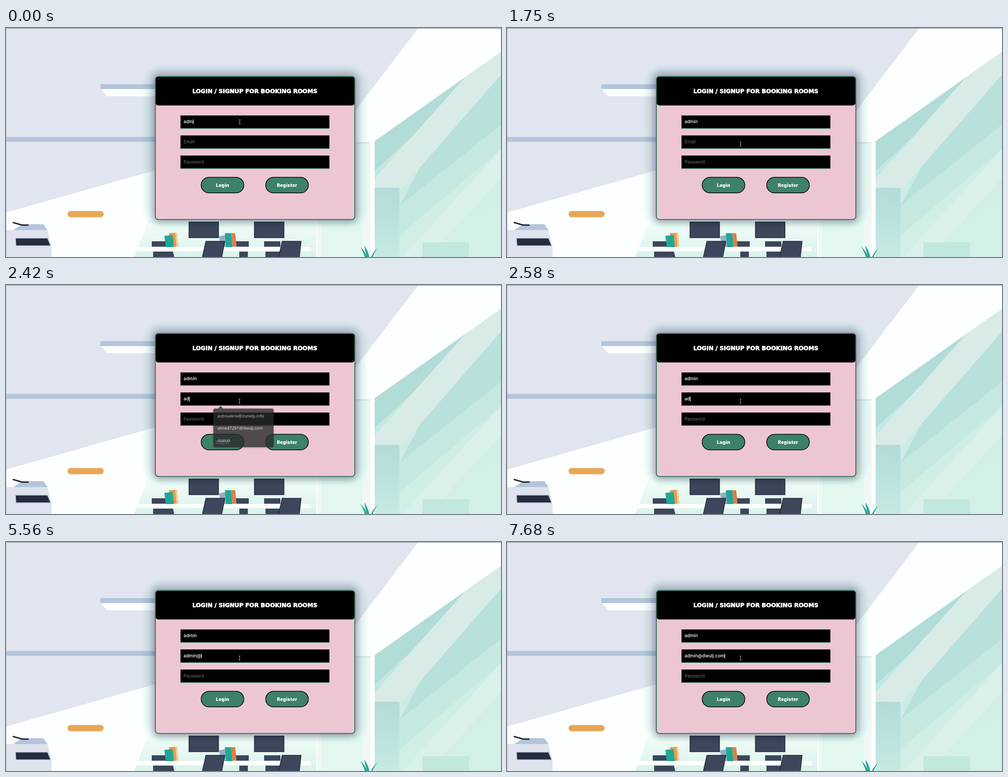
Animation, 1097 px wide and 510 px high, one loop 8 s. Source, as an HTML page:

```html
<!DOCTYPE html>
<html lang="en">
<head>
<meta charset="utf-8">
<style>
  html, body { margin: 0; width: 100%; height: 100%; overflow: hidden; background: #fdfeff; }
  svg { display: block; }
  .field { font: 500 10px Inter, sans-serif; fill: #fff; }
  .hint { font: 400 9.7px Inter, sans-serif; fill: #727272; }
  .title { font: 700 12.8px "DejaVu Sans", sans-serif; fill: #fff; stroke: #fff; stroke-width: .8px; text-anchor: middle; }
  .button { font: 900 10px Inter, sans-serif; letter-spacing: .35px; fill: #fff; text-anchor: middle; }
  .menu { font: 400 9.3px "Open Sans", sans-serif; fill: #f4f4f6; }
  .halo { mix-blend-mode: multiply; }
</style>
</head>
<body>
<svg width="1097" height="510" viewBox="0 0 1097 510">
  <defs>
    <linearGradient id="glass" x1="0" y1="0" x2=".35" y2="1">
      <stop offset="0" stop-color="#bfe4de"/><stop offset="1" stop-color="#d3f0e7"/>
    </linearGradient>
    <linearGradient id="cabinet" x1="0" y1="0" x2="0" y2="1">
      <stop offset="0" stop-color="#a9d7d5"/><stop offset="1" stop-color="#c4e9e1"/>
    </linearGradient>
    <linearGradient id="floor" x1="0" y1="0" x2="0" y2="1">
      <stop offset="0" stop-color="#f4fcf9"/><stop offset="1" stop-color="#d9f3ea"/>
    </linearGradient>
    <clipPath id="pane"><path d="M1097 53L817 252V510H1097Z"/></clipPath>
  </defs>

  <!-- office -->
  <path fill="#fdfeff" d="M0 0H1097V510H0Z"/>
  <path fill="#e1e5ef" d="M0 0H914L775 183L560 260L330 317L0 411Z"/>
  <path fill="#b5c5db" d="M209 125H340V136H209ZM0 242.500H340V253.500H0Z"/>
  <path fill="#fdfeff" d="M210 136H340V152H224Z"/>
  <path fill="#e3e9ef" d="M774 254H810L806 258H774Z"/>
  <path fill="#eff8f5" d="M774 258H808V510H690V427H774Z"/>
  <path fill="#e3f6f0" d="M698 427H790V510H698Z"/>
  <g clip-path="url(#pane)">
    <path fill="url(#glass)" d="M817 50H1097V510H817Z"/>
    <path fill="#b1dcd8" d="M817 252L1020 107L940 206L817 318Z"/>
    <path fill="#c2e8e0" d="M817 318L940 206L860 330L817 372Z"/>
    <path fill="#d9ebe7" d="M1097 53L1020 107L817 335V425L1097 104Z"/>
    <path fill="#b8e1db" d="M1097 104L918 310L872 396L1097 216Z"/>
    <path fill="#c5e9e1" d="M1097 216L872 396V462L1097 270Z"/>
    <path fill="#daf1eb" d="M1097 270L880 510H935L1097 335Z"/>
    <path fill="url(#cabinet)" opacity=".8" d="M817 356H872V510H817Z"/>
    <path fill="#c2e8de" d="M923 477H1026V510H923Z"/>
  </g>
  <path fill="url(#floor)" d="M316 428H688V510H284Z"/>
  <rect x="136.500" y="407.500" width="80" height="14" rx="7" fill="#e6a757"/>

  <!-- copier -->
  <path fill="#dfe3ee" d="M0 450H92L101 488V510H0Z"/>
  <path fill="#b5c4da" d="M16 450L36 437H83L92 450Z"/>
  <path fill="#252c3e" stroke="#b5c4da" stroke-width="1.500" d="M21 468H92L99 485H22Z"/>
  <path fill="none" stroke="#202432" stroke-width="3" d="M15 433L36 439L50 439"/>

  <!-- desk -->
  <g fill="#3b465b" stroke="#20283a" stroke-width="1.500">
    <path d="M405.500 432H471V467H405.500ZM550.500 432H616V467H550.500Z"/>
    <path stroke="none" d="M323 475H372V487H323ZM508 475H538V487H508ZM572 475H608V487H572ZM326 498H370L373 510H326ZM517 498H536V510H517ZM575 498H607V510H575Z"/>
  </g>
  <path fill="#fdfeff" d="M292 488H675V497H286Z"/>
  <path fill="#e79a50" d="M361 457L379 456L382 487H364Z"/>
  <path fill="#f5cf98" d="M375 457L379 456L382 487H378Z"/>
  <path fill="#20a797" d="M351 463L369 461L372 488H354Z"/>
  <path fill="#8eafc4" d="M472 464L487 461L491 488H477Z"/>
  <path fill="#20a797" d="M485 457H499L502 488H488Z"/>
  <path fill="#df7f45" d="M499 457H508L511 487H502Z"/>
  <path fill="#3c475c" stroke="#222a3c" stroke-width="1.500" d="M443 475H485L478 511H435ZM612 475H654L650 511H604Z"/>
  <path fill="#27a498" d="M795 510Q792 498 785 487Q797 498 800 510ZM800 510Q796 497 794 484Q803 497 805 510ZM809 510Q813 500 823 491Q815 502 813 510Z"/>

  <!-- card -->
  <g class="halo">
    <rect x="305" y="85" width="494" height="359" rx="42" fill="#e9fbf4" style="filter:blur(3px)"/>
    <rect x="318" y="93" width="468" height="344" rx="28" fill="#dcdde5" style="filter:blur(4px)"/>
    <rect x="329" y="107" width="446" height="322" rx="10" fill="#6c6e7a" opacity=".6" style="filter:blur(7px)"/>
  </g>
  <rect x="331" y="108" width="442" height="318.500" rx="7" fill="#edc6d3" stroke="#2d7a62" stroke-width="2"/>
  <rect x="332" y="109" width="440" height="63.500" rx="5"/>
  <text class="title" x="551.500" y="145">LOGIN / SIGNUP FOR BOOKING ROOMS</text>
  <path d="M386.700 194.700h330v29h-330ZM386.700 239.200h330v29h-330ZM386.700 283.900h330v29h-330Z"/>
  <path stroke="#2d7a62" stroke-width="1.300" d="M386.700 223.700h330M386.700 268.400h330M386.700 312.900h330"/>
  <g fill="#3d8169" stroke="#000" stroke-width="1.500">
    <rect x="432.500" y="332.500" width="94.600" height="34.800" rx="17.400"/>
    <rect x="575.500" y="332.500" width="94.600" height="34.800" rx="17.400"/>
  </g>
  <text class="button" x="480" y="354">Login</text>
  <text class="button" x="623" y="354">Register</text>
  <text class="field" id="user" x="393.500" y="212.300"/>
  <text class="hint" id="emailHint" x="393.500" y="257">Email</text>
  <text class="field" id="email" x="393.500" y="257"/>
  <text class="hint" x="393.500" y="301.700">Password</text>
  <rect id="caret" width="1.200" height="11" fill="#fff"/>
  <g id="menuAll"/>
  <g id="menuSome"/>
  <path id="pointer" fill="none" stroke="#b4b4b4" d="M-2 -4.500H2M0 -4.500V4.500M-2 4.500H2"/>

  <path fill="#8f9093" d="M0 0H1097V1.300H0Z"/>
  <path fill="#b9bcc4" d="M0 0H.8V510H0Z"/>
</svg>
<script>
const LOOP = 8000;
const $ = id => document.getElementById(id);

// [start, text, caret visible]
const userSteps = [
  [0, 'adm', 1], [70, 'admi', 1], [170, 'admin', 1],
  [760, 'admin', 0], [1260, 'admin', 1], [1750, 'admin', 0]
];
const emailSteps = [
  [0, '', 0], [2170, '', 1], [2200, 'a', 1], [2380, 'ad', 1], [2800, 'adm', 1], [3330, 'adm', 0],
  [3590, 'admi', 1], [3680, 'admin', 1], [4250, 'admin', 0],
  [4760, 'admin2', 1], [5260, 'admin2', 0], [5320, 'admin', 1],
  [5560, 'admin@', 1], [6070, 'admin@', 0], [6130, 'admin@d', 1], [6270, 'admin@dw', 1],
  [6410, 'admin@dwu', 1], [6530, 'admin@dwul', 1], [6650, 'admin@dwulj', 1],
  [7200, 'admin@dwulj', 0], [7230, 'admin@dwulj.', 1],
  [7460, 'admin@dwulj.c', 1], [7570, 'admin@dwulj.co', 1], [7680, 'admin@dwulj.com', 1]
];

function buildMenu(id, width, lines) {
  const height = lines.length * 27 + 5;
  $(id).innerHTML =
    `<rect x="459.500" y="276" width="${width}" height="${height}" rx="4" opacity=".3" style="filter:blur(2px)"/>
     <rect x="459.500" y="275.300" width="${width}" height="${height}" rx="3.500" fill="#292a2d"/>
     <path fill="#292a2d" d="M469.500 275.500L475.500 269.500L481.500 275.500Z"/>` +
    lines.map((line, i) => `<text class="menu" x="468.500" y="${295.3 + i * 26.7}">${line}</text>`).join('');
}
buildMenu('menuAll', 198.5, [
  'teshvalukura268@dwulj.com', 'aobtuekrw@zunelp.info', 'teshvalukura573@dwulj.com',
  'teshvalukura.brn28305416@vopu.ac.in', 'TeshValukura.brn28305416@vopu.ac.in',
  'teshvalukura316@dwulj.com'
]);
buildMenu('menuSome', 133.5, ['aobtuekrw@zunelp.info', 'alme47291@dwulj.com', 'asasas']);

const stepAt = (steps, t) => steps.findLast(step => step[0] <= t);
const ease = (t, from, to) => {
  const p = Math.min(1, Math.max(0, (t - from) / (to - from)));
  return p * p * (3 - 2 * p);
};

function draw(t) {
  const [, userText, userCaret] = stepAt(userSteps, t);
  const [, emailText, emailCaret] = stepAt(emailSteps, t);
  $('user').textContent = userText;
  $('email').textContent = emailText;
  $('emailHint').style.display = emailText ? 'none' : '';

  const inEmail = t >= 2170;
  const caret = $('caret');
  caret.setAttribute('x', 393.7 + $(inEmail ? 'email' : 'user').getComputedTextLength());
  caret.setAttribute('y', inEmail ? 248.5 : 203.5);
  caret.style.opacity = inEmail ? emailCaret : userCaret;

  $('menuAll').style.display = t >= 2170 && t < 2240 ? '' : 'none';
  $('menuSome').style.opacity = t < 2240 ? 0 : Math.min(1, Math.max(0, (2580 - t) / 200));

  const down = ease(t, 730, 1080), back = ease(t, 1240, 1750);
  $('pointer').setAttribute('transform', `translate(${518 - .5 * back} ${209 + 58 * down - 8.5 * back})`);
}

function tick() {
  draw(performance.now() % LOOP);
  requestAnimationFrame(tick);
}
tick();
</script>
</body>
</html>
```
